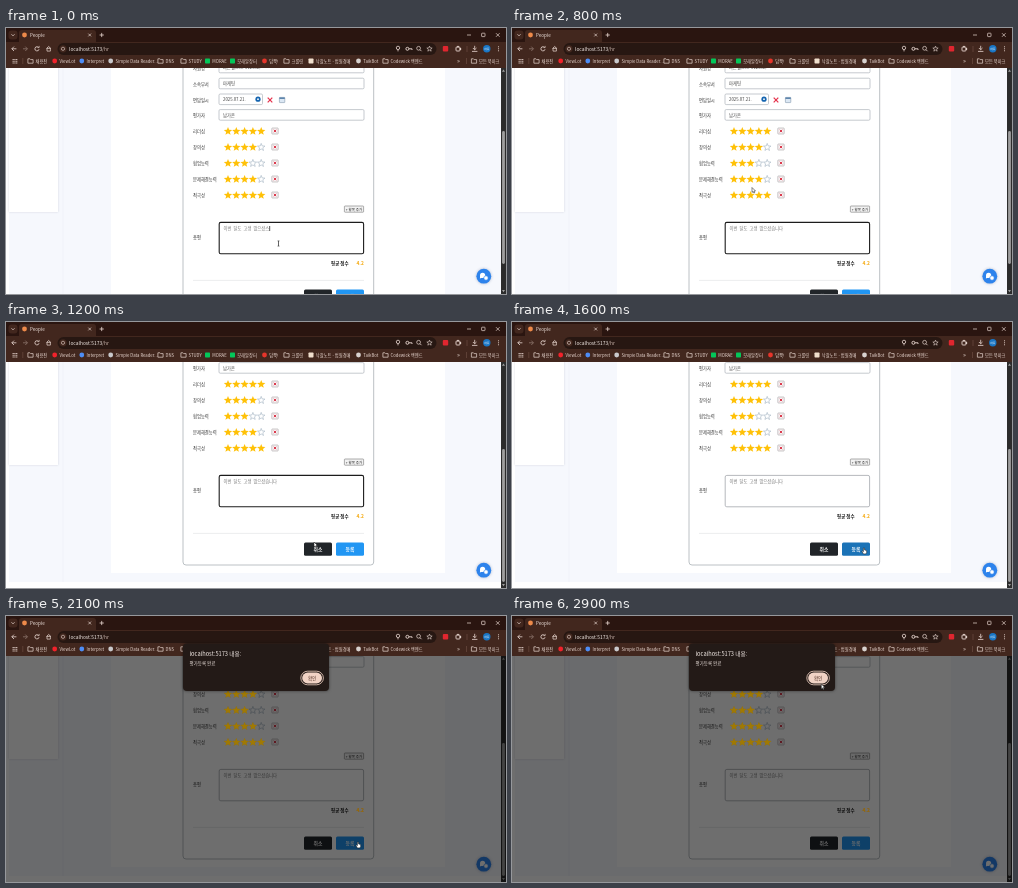
An HTML page with a canvas for the animation above (3000 ms loop, 500 px wide and 266 px high).

```html
<!DOCTYPE html>
<html lang="ko">
<head>
<meta charset="utf-8">
<title>People</title>
<style>
html, body { margin: 0; width: 100%; height: 100%; overflow: hidden; background: #fff; }
canvas { display: block; width: 100vw; height: 100vh; }
</style>
</head>
<body>
<canvas id="stage" width="500" height="266"></canvas>
<script>
const ctx = document.getElementById('stage').getContext('2d');
const LOOP = 3000, STEP = 100;
const SANS = '"Noto Sans CJK KR", "Noto Sans CJK", "Noto Sans", sans-serif';
const MONO = '"Noto Sans Mono CJK KR", "Noto Sans CJK KR", "Noto Sans CJK", monospace';
const GOLD = '#ffc107', PALE = '#ead9d2', TOOLBAR = '#42271e', FRAME = '#2a1510';

function shiftY(dy) {
  ctx.transform(1, 0, 0, 1, 0, dy);
}

function rect(x, y, w, h, fill, r = 0, stroke, line = 0.7) {
  ctx.beginPath();
  ctx.roundRect(x, y, w, h, r);
  if (fill) { ctx.fillStyle = fill; ctx.fill(); }
  if (stroke) { ctx.strokeStyle = stroke; ctx.lineWidth = line; ctx.stroke(); }
}

function circle(x, y, r, fill, stroke, line = 0.7) {
  rect(x - r, y - r, 2 * r, 2 * r, fill, r, stroke, line);
}

function text(s, x, y, size = 4.4, color = '#333', weight = 400, align = 'left', family = SANS) {
  ctx.font = `${weight} ${size}px ${family}`;
  ctx.textAlign = align;
  ctx.textBaseline = 'middle';
  ctx.fillStyle = color;
  ctx.fillText(s, x, y);
}

// Each path is a flat list of x, y pairs.
function trace(points, x = 0, y = 0) {
  ctx.beginPath();
  for (let i = 0; i < points.length; i += 2) ctx.lineTo(x + points[i], y + points[i + 1]);
}

function line(points, color, width = 0.8) {
  trace(points);
  ctx.strokeStyle = color;
  ctx.lineWidth = width;
  ctx.stroke();
}

function cross(x, y, r, color, width) {
  line([x - r, y - r, x + r, y + r], color, width);
  line([x - r, y + r, x + r, y - r], color, width);
}

function star(x, y, r, fill, stroke) {
  const points = [];
  for (let i = 0; i < 10; i++) {
    const a = i * Math.PI / 5 - Math.PI / 2, d = i % 2 ? r * 0.43 : r;
    points.push(d * Math.cos(a), d * Math.sin(a));
  }
  trace(points, x, y);
  ctx.closePath();
  if (fill) { ctx.fillStyle = fill; ctx.fill(); }
  if (stroke) { ctx.strokeStyle = stroke; ctx.lineWidth = 0.6; ctx.stroke(); }
}

function folder(x) {
  trace([-2.6, -2.2, -0.6, -2.2, 0.2, -1.4, 2.6, -1.4, 2.6, 2.2, -2.6, 2.2], x, 33);
  ctx.closePath();
  ctx.strokeStyle = PALE;
  ctx.lineWidth = 0.7;
  ctx.stroke();
}

function drawTabs() {
  rect(0, 0, 500, 14, FRAME);
  rect(2.5, 2.5, 9, 9, TOOLBAR, 3);
  line([5.5, 6.3, 7, 7.8, 8.5, 6.3], PALE);
  rect(13, 2, 77, 13, TOOLBAR, [3, 3, 0, 0]);
  circle(18.5, 7, 2.4, '#ee8a4a');
  text('People', 24, 7.2, 4.6, '#f3e7e2');
  cross(83.7, 7, 1.4, PALE, 0.7);
  line([93.6, 7, 97.8, 7], PALE);
  line([95.7, 4.9, 95.7, 9.1], PALE);
  line([461, 7, 465, 7], PALE, 0.7);
  rect(475.6, 5.2, 3.4, 3.4, null, 0.5, PALE);
  cross(491.8, 7, 1.8, PALE, 0.7);
}

function drawToolbar() {
  rect(0, 14, 500, 26, TOOLBAR);
  line([10.4, 20.8, 5.8, 20.8], PALE);
  line([8, 18.6, 5.8, 20.8, 8, 23], PALE);
  line([17, 20.8, 21.4, 20.8], '#8f776e');
  line([19.3, 18.6, 21.4, 20.8, 19.3, 23], '#8f776e');
  ctx.beginPath();
  ctx.arc(31, 20.8, 2.1, 0.2, 5.4);
  ctx.strokeStyle = PALE;
  ctx.stroke();
  line([31.4, 19.6, 33.1, 19.6, 33.1, 17.9], PALE, 0.7);
  line([40.4, 20.7, 42.7, 18.5, 45, 20.7], PALE);
  rect(41, 20.4, 3.4, 2.7, null, 0, PALE);

  rect(51.5, 15, 379, 12, '#271712', 6);
  circle(57, 20.8, 3.6, TOOLBAR);
  circle(57, 20.8, 1.6, null, PALE, 0.6);
  text('localhost:5173', 63, 21, 4.9, '#f7eeea');
  const host = ctx.measureText('localhost:5173').width;
  text('/hr', 63 + host, 21, 4.9, '#c7b2a9');

  circle(392, 19.9, 1.7, null, PALE, 0.8);
  line([392, 21.6, 392, 23.4], PALE);
  circle(401.4, 20.8, 1.5, null, PALE, 0.9);
  line([402.9, 20.8, 406, 20.8, 406, 22], PALE, 0.9);
  circle(412.6, 20.3, 1.9, null, PALE);
  line([414, 21.7, 415.5, 23.2], PALE);
  star(423.5, 20.9, 2.8, null, PALE);

  rect(436.8, 18, 5.4, 5.6, '#e0262f', 1);
  rect(450, 19, 4, 4, null, 0.8, PALE, 0.9);
  circle(452, 18.6, 0.9, PALE);
  circle(454.4, 21, 0.9, PALE);
  line([461, 18, 461, 24], '#725347', 0.6);
  line([468.7, 17.8, 468.7, 21.6], PALE);
  line([466.9, 20, 468.7, 21.8, 470.5, 20], PALE);
  line([466, 23.4, 471.4, 23.4], PALE);
  circle(480.8, 20.8, 3.7, '#1976c5');
  text('하루', 480.8, 20.9, 2.8, '#fff', 400, 'center');
  for (const dy of [-2, 0, 2]) circle(492.5, 20.8 + dy, 0.55, PALE);
}

function drawBookmarks() {
  const size = 4.25;
  for (let i = 0; i < 9; i++) rect(6.6 + (i % 3) * 1.8, 30.9 + Math.floor(i / 3) * 1.8, 1.1, 1.1, PALE);
  line([16.8, 30, 16.8, 36], '#725347', 0.6);
  const folders = [[24.5, '채용전'], [154.5, 'DNS'], [177.5, 'STUDY'], [280.5, '크롤링'], [379.5, 'Codewick 백엔드'], [468, '모든 북마크']];
  for (const [x, label] of folders) {
    folder(x);
    text(label, x + 5, 33.2, size, PALE);
  }
  const sites = [
    [48.7, '#f1222b', 'ViewLot'], [75.8, '#4d8df6', 'Interpret'], [104.7, '#c9c9cc', 'Simple Data Reader...'],
    [201.5, '#03c75a', 'MORAE'], [226.5, '#03c75a', '모래알장터'], [258.5, '#e6352b', '담뿍!'],
    [305, '#f0dfcd', '낙찰노트 - 법원경매'], [352.5, '#d8d2cf', 'TalkBot']
  ];
  sites.forEach(([x, color, label], i) => {
    if (i === 3 || i === 4 || i === 6) rect(x - 2.5, 30.5, 5, 5, color, 0.7);
    else circle(x, 33, 2.4, color);
    text(label, x + 4.8, 33.2, size, PALE);
  });
  text('»', 452.5, 32.6, 6, PALE, 400, 'center');
  line([460.5, 30, 460.5, 36], '#725347', 0.6);
}

function field(y, value, w = 145) {
  rect(213, y - 5.4, w, 10.6, '#fff', 1.2, '#aeb4ba', 0.7);
  text(value, 217, y, 4.3, '#444');
}

const RATINGS = [['리더십', 5], ['창의성', 4], ['협업능력', 3], ['문제해결능력', 4], ['적극성', 5]];

function drawStars(onlyFilled) {
  RATINGS.forEach(([, score], row) => {
    for (let i = 0; i < 5; i++) {
      const filled = i < score;
      if (filled || !onlyFilled) {
        star(222 + i * 8.3, 103.3 + row * 16, filled ? 4.4 : 3.9, filled ? GOLD : '#fff', filled ? null : '#9fb0c0');
      }
    }
  });
}

function drawAverage() {
  text('4.2', 357.8, 235, 4.9, '#f5a80b', 700, 'right');
}

function button(x, label, color) {
  rect(x, 261.4, 28, 13.4, color, 1.5);
  text(label, x + 14, 268.2, 4.8, '#fff', 700, 'center');
}

function drawForm(step, hover) {
  rect(3, 0, 492, 301, '#f6f8fd');
  ctx.save();
  ctx.shadowColor = 'rgba(40,50,80,.18)';
  ctx.shadowBlur = 2;
  rect(3, 0, 49, 184, '#fff');
  ctx.restore();
  line([57, 0, 57, 301], '#eef1f7', 0.7);
  rect(105, 0, 334, 292, '#fff');
  rect(177, -20, 190.7, 304, '#fff', 3, '#b5babf', 0.9);

  const labels = [['사원명', 40.6], ['소속부서', 56], ['면담일시', 72], ['평가자', 87.2], ['총평', 209]];
  for (const [label, y] of labels) text(label, 187, y, 4.3, '#333', 500);
  field(39.6, '라온별(EMP012352)');
  field(55.6, '마케팅');
  field(71.4, '2025.07.21.', 43.5);
  circle(252, 71.2, 2.6, '#1565b0');
  circle(252, 71.2, 0.9, '#fff');
  cross(264, 72, 2.3, '#e5304a', 1.2);
  rect(273.4, 69.4, 5.4, 5.2, '#dce8f4', 0.5, '#8298ad', 0.6);
  rect(273.4, 69.4, 5.4, 1.6, '#5f86ad');
  field(87, '남가온');

  RATINGS.forEach(([label], row) => {
    const y = 103 + row * 16;
    text(label, 187, y, 4.3, '#333', 500);
    rect(265.8, y - 3, 6.4, 6, '#f6f1f2', 0.6, '#a8a4a6', 0.6);
    cross(269, y, 1.2, '#d8263c', 0.9);
  });
  drawStars(false);

  rect(338.4, 178, 19.2, 6.2, '#f2f2f2', 0.6, '#777', 0.6);
  text('+ 항목 추가', 348, 181.2, 3.5, '#222', 400, 'center');

  const focused = step < 16;
  rect(213.2, 194.4, 144.4, 31.4, '#fff', 1.6, focused ? '#1c1c1c' : '#a4a8ac', focused ? 1.1 : 0.8);
  const typed = '이번 달도 고생 많으셨' + ['스', '습', '습니', '습니다'][Math.min(step, 3)];
  text(typed, 217.6, 200.4, 4.25, '#777', 400, 'left', MONO);
  if (step < 4) {
    const x = 218.2 + ctx.measureText(typed).width;
    line([x, 198, x, 203], '#111', 0.7);
  }

  text('평균 점수', 325, 235, 4.5, '#222', 700);
  drawAverage();
  line([187, 252.4, 358, 252.4], '#e4e6e9', 0.7);
  button(298, '취소', '#212529');
  button(330, '등록', hover ? '#1b73b7' : '#2196f3');
}

function drawChat() {
  ctx.save();
  ctx.shadowColor = 'rgba(0,40,100,.3)';
  ctx.shadowBlur = 3;
  circle(477.8, 248.2, 7.4, '#2d83ec');
  ctx.restore();
  circle(476.6, 247.3, 2.6, '#fff');
  trace([474.2, 247.5, 473.9, 250.4, 476.6, 249.6]);
  ctx.fill();
  circle(480, 250, 2.2, '#fff', '#2d83ec', 0.6);
}

function drawScrollbar(scroll) {
  rect(495, 40, 5, 226, '#2c2c2c');
  rect(496.1, 103 + scroll * 0.585, 2.8, 133, '#9f9f9f', 1.4);
  trace([496, 43.8, 497.5, 41.6, 499, 43.8]);
  ctx.fill();
  trace([496, 262, 497.5, 264.2, 499, 262]);
  ctx.fill();
}

function drawDialog(opening) {
  ctx.save();
  if (opening) {
    ctx.globalAlpha = 0.55;
    shiftY(-4);
  }
  ctx.shadowColor = 'rgba(0,0,0,.5)';
  ctx.shadowBlur = 3;
  rect(177, 27.4, 146, 47.6, '#231a17', 4);
  ctx.shadowBlur = 0;
  text('localhost:5173 내용:', 183.5, 38.2, 5.7, '#f4ebe7', 500);
  text('평가등록 완료', 183.5, 47.7, 4.5, '#e6dcd7');
  rect(294.8, 55.2, 22.6, 13.6, null, 6.8, '#f1d3c5', 0.8);
  rect(296.2, 56.6, 19.8, 10.8, '#f1d3c5', 5.4);
  text('확인', 306.1, 62.2, 4.5, '#4a2a1e', 500, 'center');
  ctx.restore();
}

const CURSOR_KEYS = [
  [0, 272.5, 215.5], [4, 206, 138], [6, 206, 138], [8, 240, 159.5], [10, 277, 207],
  [12, 308, 220], [16, 352, 226], [23, 352, 226], [25, 280, 173], [27, 286, 112], [29, 309.3, 68]
];

function cursorAt(step) {
  const i = Math.max(1, CURSOR_KEYS.findIndex(key => key[0] >= step));
  const [s0, x0, y0] = CURSOR_KEYS[i - 1], [s1, x1, y1] = CURSOR_KEYS[i];
  const k = (step - s0) / (s1 - s0);
  return { x: x0 + (x1 - x0) * k, y: y0 + (y1 - y0) * k };
}

function drawCursor(x, y, kind) {
  if (kind === 'beam') {
    line([x, y - 2.6, x, y + 2.6], '#222', 0.7);
    line([x - 1, y - 2.6, x + 1, y - 2.6], '#222', 0.5);
    line([x - 1, y + 2.6, x + 1, y + 2.6], '#222', 0.5);
    return;
  }
  const hand = [-0.6, 0, 0.5, 0, 0.6, 2, 2.6, 2.6, 2.7, 4.4, 1.9, 5.9, -0.5, 5.9, -2.1, 3.6, -1.6, 3, -0.6, 3.7];
  const arrow = [0, 0, 0, 4.9, 1.1, 3.9, 1.9, 5.6, 2.7, 5.2, 2, 3.6, 3.5, 3.5];
  trace(kind === 'hand' ? hand : arrow, x, y);
  ctx.closePath();
  ctx.fillStyle = '#fff';
  ctx.fill();
  ctx.strokeStyle = '#222';
  ctx.lineWidth = 0.55;
  ctx.stroke();
}

function draw(step) {
  const scroll = step < 9 ? 0 : [18, 36, 40, 41][Math.min(step - 9, 3)];
  const cursor = cursorAt(step);
  const open = step >= 19;
  const hover = cursor.x > 330 && !open;

  rect(0, 0, 500, 266, '#fff');
  ctx.save();
  ctx.beginPath();
  ctx.rect(0, 40, 500, 226);
  ctx.clip();
  shiftY(-scroll);
  drawForm(step, hover);
  shiftY(scroll);
  drawChat();
  drawScrollbar(scroll);
  if (open) {
    rect(0, 40, 500, 226, 'rgba(0,0,0,.57)');
    ctx.globalAlpha = 0.35;
    shiftY(-scroll);
    drawStars(true);
    drawAverage();
  }
  ctx.restore();

  drawTabs();
  drawToolbar();
  drawBookmarks();
  if (open) drawDialog(step === 19);

  const onButton = hover || (open && step < 27);
  drawCursor(cursor.x, cursor.y, step === 0 ? 'beam' : onButton ? 'hand' : 'arrow');
}

function tick() {
  draw(Math.floor(performance.now() % LOOP / STEP));
  requestAnimationFrame(tick);
}
tick();
</script>
</body>
</html>
```
